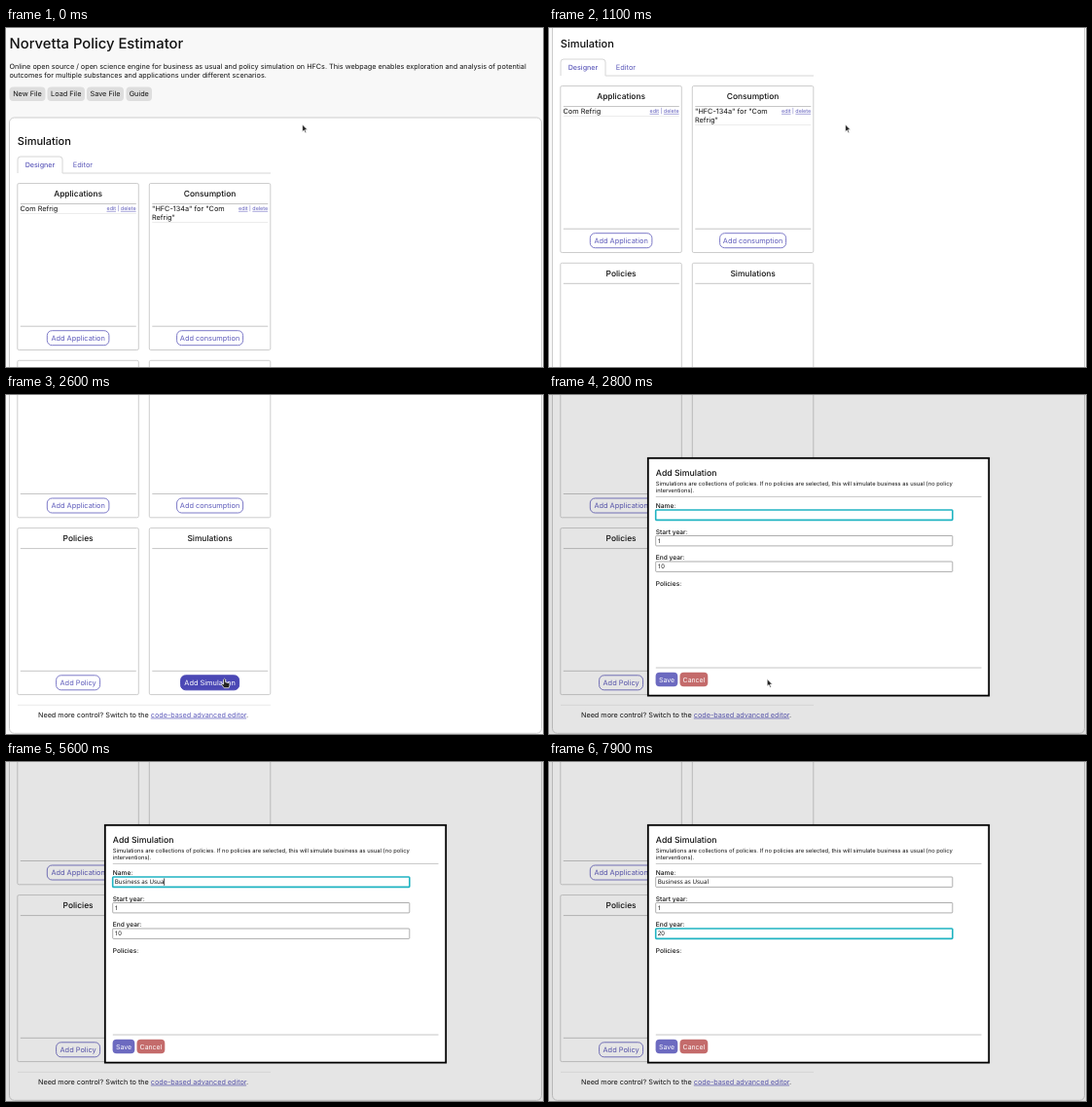
Animation, 552 px wide and 348 px high, one loop 8000 ms. Source, as an HTML page:

```html
<!DOCTYPE html>
<html lang="en">
<head>
<meta charset="utf-8">
<title>Policy simulation</title>
<style>
  html, body { margin: 0; width: 100%; height: 100%; overflow: hidden; background: #f8f8f8; }
  svg { display: block; }
  text { font-family: Inter, sans-serif; text-rendering: geometricPrecision; white-space: pre; fill: #111; }
  .strong { font-weight: 500; }
  .mid { text-anchor: middle; }
  .end { text-anchor: end; }
  .link { fill: #5f5cbb; }
  .under { text-decoration: underline; }
  .input { font-family: "Noto Sans", sans-serif; }
  .white { fill: #fff; }
  .line { stroke: #c6c6c6; }
  .faint { stroke: #ececec; }
  .card { fill: #fff; stroke: #cdcdcd; }
  .outline { fill: #fff; stroke: #7d7ac8; }
  .hover .outline { fill: #4b48b5; stroke: #4b48b5; }
  .hover .link { fill: #fff; }
  .field { fill: #fff; stroke: #8c8c8c; stroke-width: .7; }
  .focus { stroke: #20b4c2; stroke-width: 1.6; }
  .pointer { fill: #222; stroke: #fff; stroke-width: .7; stroke-linejoin: round; }
</style>
</head>
<body>
<svg id="stage" width="552" height="348" viewBox="0 0 552 348"></svg>
<script>
const text = (x, y, size, str, cls = "", id = "") =>
  `<text x="${x}" y="${y}" font-size="${size}" class="${cls}" id="${id}">${str}</text>`;
const rect = (x1, y1, x2, y2, r, attrs) =>
  `<rect x="${x1}" y="${y1}" width="${x2 - x1}" height="${y2 - y1}" rx="${r}" ${attrs}/>`;
const line = (x1, x2, y, cls = "line") => `<path class="${cls}" d="M${x1} ${y}H${x2}"/>`;

const grayButton = (x1, x2, label) =>
  rect(x1, 60.5, x2, 75, 4, 'fill="#dedede"') + text((x1 + x2) / 2, 70.3, 7.3, label, "mid");

// One designer panel; half is half the width of its button
const panel = (x, y, title, label, half, id, rows = "") => `
  <g transform="translate(${x} ${y})">
    ${rect(0, 0, 124.5, 171, 1.5, 'class="card"')}
    ${text(62.3, 13.7, 8.4, title, "mid strong")}
    ${line(3, 122, 21)}${line(3, 122, 146.7)}${rows}
    <g id="${id}">
      ${rect(62.3 - half, 151.2, 62.3 + half, 166.2, 5, 'class="outline"')}
      ${text(62.3, 161.4, 7.4, label, "mid link")}
    </g>
  </g>`;

const rowLinks = `<text class="link end" x="121.8" y="27.4" font-size="5.4"><tspan class="under">edit</tspan> | <tspan class="under">delete</tspan></text>`;

const page = `
  ${text(3.5, 21, 14.8, "Norvetta Policy Estimator", "strong")}
  ${text(3.5, 42.3, 7.25, "Online open source / open science engine for business as usual and policy simulation on HFCs. This webpage enables exploration and analysis of potential")}
  ${text(3.5, 51, 7.25, "outcomes for multiple substances and applications under different scenarios.")}
  ${grayButton(3.5, 40.5, "New File")}${grayButton(42.5, 81, "Load File")}
  ${grayButton(83, 121, "Save File")}${grayButton(123.5, 150, "Guide")}
  ${rect(3.5, 92, 550.5, 552, 5, 'class="card"')}
  ${text(11.8, 119.7, 11, "Simulation", "strong")}
  <path d="M12 149V135q0-3 3-3H55q3 0 3 3V149H272" fill="none" stroke="#d6d6d6"/>
  ${text(35, 143.2, 7.15, "Designer", "mid strong link")}
  ${text(79, 143.2, 7.4, "Editor", "mid link")}
  ${panel(11.8, 159.5, "Applications", "Add Application", 31.8, "addApplication",
    text(2.7, 28.2, 7.3, "Com Refrig") + rowLinks + line(3, 122, 31, "faint"))}
  ${panel(147.3, 159.5, "Consumption", "Add consumption", 34, "addConsumption",
    text(2.7, 28.2, 7.3, '"HFC-134a" for "Com') + text(2.7, 37.4, 7.3, 'Refrig"') + rowLinks + line(3, 122, 40, "faint"))}
  ${panel(11.8, 341.3, "Policies", "Add Policy", 22.5, "addPolicy")}
  ${panel(147.3, 341.3, "Simulations", "Add Simulation", 30, "addSimulation")}
  ${line(12, 272, 523, "faint")}
  <text x="33" y="535.3" font-size="7.22">Need more control? Switch to the <tspan class="link under">code-based advanced editor</tspan>.</text>`;

const field = (y, label, id) =>
  text(109.8, y - 7.2, 6.6, label, "strong") +
  rect(109.7, y - 5.2, 414.8, y + 5.2, .8, `class="field" id="${id}Box"`) +
  text(111.8, y + 2, 6.25, "", "input", id);

const dialog = `
  <rect width="552" height="348" fill="#000" fill-opacity=".1"/>
  ${rect(101.8, 64.8, 452.2, 308.6, 0, 'fill="#fff" stroke="#000" stroke-width="1.8"')}
  ${text(109.8, 83.1, 8.7, "Add Simulation", "strong")}
  ${text(109.8, 93.2, 5.83, "Simulations are collections of policies. If no policies are selected, this will simulate business as usual (no policy")}
  ${text(109.8, 100.4, 5.83, "interventions).")}
  ${line(109.8, 444.5, 104.4)}
  ${field(123.2, "Name:", "name")}${field(149.7, "Start year:", "start")}${field(176.2, "End year:", "end")}
  ${text(109.8, 195.7, 6.6, "Policies:", "strong")}
  ${line(109.8, 444.5, 280)}
  ${rect(109.6, 284.7, 132.3, 299.3, 4, 'fill="#6c6ac0"')}${text(121, 294.7, 6.9, "Save", "mid white")}
  ${rect(134.5, 284.7, 163.3, 299.3, 4, 'fill="#c46b6b"')}${text(148.9, 294.7, 6.9, "Cancel", "mid white")}
  <rect id="caret" width=".7" height="7.4"/>`;

const pointers = {
  arrow: '<path class="pointer" d="M0 0V7.6L1.8 6L3 8.8L4.2 8.3L3 5.6H5.4Z"/>',
  hand: '<path class="pointer" d="M-1 1Q0-.6 1 1V3.8L4.5 4.7Q5.8 5.3 5.4 7L4.5 9.7H-.4L-3 6.2Q-2.6 4.7-1 6Z"/>',
  beam: '<path d="M-1.3-4.5Q0-4.5 0-3.6V3.6Q0 4.5-1.3 4.5M1.3-4.5Q0-4.5 0-3.6M1.3 4.5Q0 4.5 0 3.6" fill="none" stroke="#222" stroke-width=".7"/>'
};

const $ = id => document.getElementById(id);
$("stage").innerHTML = `<g id="page">${page}</g><g id="dialog">${dialog}</g>` +
  Object.entries(pointers).map(([id, shape]) => `<g id="${id}">${shape}</g>`).join("");

const scroll = [[800, 0], [900, 10], [1000, 53], [1100, 100], [1200, 136], [1300, 164], [1400, 184], [1500, 198.3], [1600, 204.7]];
const approach = [[6200, 202, 227], [6300, 193, 204], [6400, 188, 188], [6500, 186.3, 180], [6600, 184.2, 175.5]];
// [time, letters typed]
const nameKeys = [[0, 0], [3500, 1], [3700, 2], [3800, 3], [3900, 4], [4000, 5], [4100, 7], [4300, 8], [4500, 9],
  [4700, 11], [5000, 12], [5200, 13], [5300, 14], [5400, 15], [5600, 16], [5700, 17]];
const yearKeys = [[0, "10"], [6700, "10"], [7200, "1"], [7300, ""], [7400, "2"], [7500, "20"]];

const latest = (keys, t) => keys.findLast(k => k[0] <= t) || keys[0];
const show = (id, on) => $(id).style.display = on ? "" : "none";

function pointerAt(t) {
  if (t < 2800) {
    const u = Math.min(1, Math.max(0, (t - 1800) / 800)), e = u * u * (3 - 2 * u);
    const y = 99 + 192 * e;
    return [y > 288 ? "hand" : "arrow", 304.6 - 80 * e, y];
  }
  if (t < 3500) return ["arrow", 224.2, 291.5];
  if (t < 6200 || t >= 7200) return [];
  const [, x, y] = latest(approach, t);
  return [t < 6600 ? "arrow" : "beam", x, y];
}

function draw() {
  const t = Math.floor(performance.now() % 8000 / 100) * 100;
  const [shape, x, y] = pointerAt(t);
  for (const id in pointers) show(id, id === shape);
  if (shape) $(shape).setAttribute("transform", `translate(${x} ${y})`);

  $("page").setAttribute("transform", `translate(0 ${-latest(scroll, t)[1]})`);
  $("addSimulation").classList.toggle("hover", shape === "hand");

  show("dialog", t >= 2800);
  const nameKey = latest(nameKeys, t), yearKey = latest(yearKeys, t);
  $("name").textContent = "Business as Usual".slice(0, nameKey[1]);
  $("start").textContent = "1";
  $("end").textContent = yearKey[1];

  const onYear = t >= 6700, active = onYear ? "end" : "name";
  $("nameBox").classList.toggle("focus", !onYear);
  $("endBox").classList.toggle("focus", onYear);
  if (t >= 2800) {
    const since = t - (onYear ? yearKey : nameKey)[0];
    show("caret", since < 500 && t < 7900);
    $("caret").setAttribute("x", 111.8 + $(active).getComputedTextLength());
    $("caret").setAttribute("y", onYear ? 172.4 : 119.4);
  }
  requestAnimationFrame(draw);
}
draw();
</script>
</body>
</html>
```
